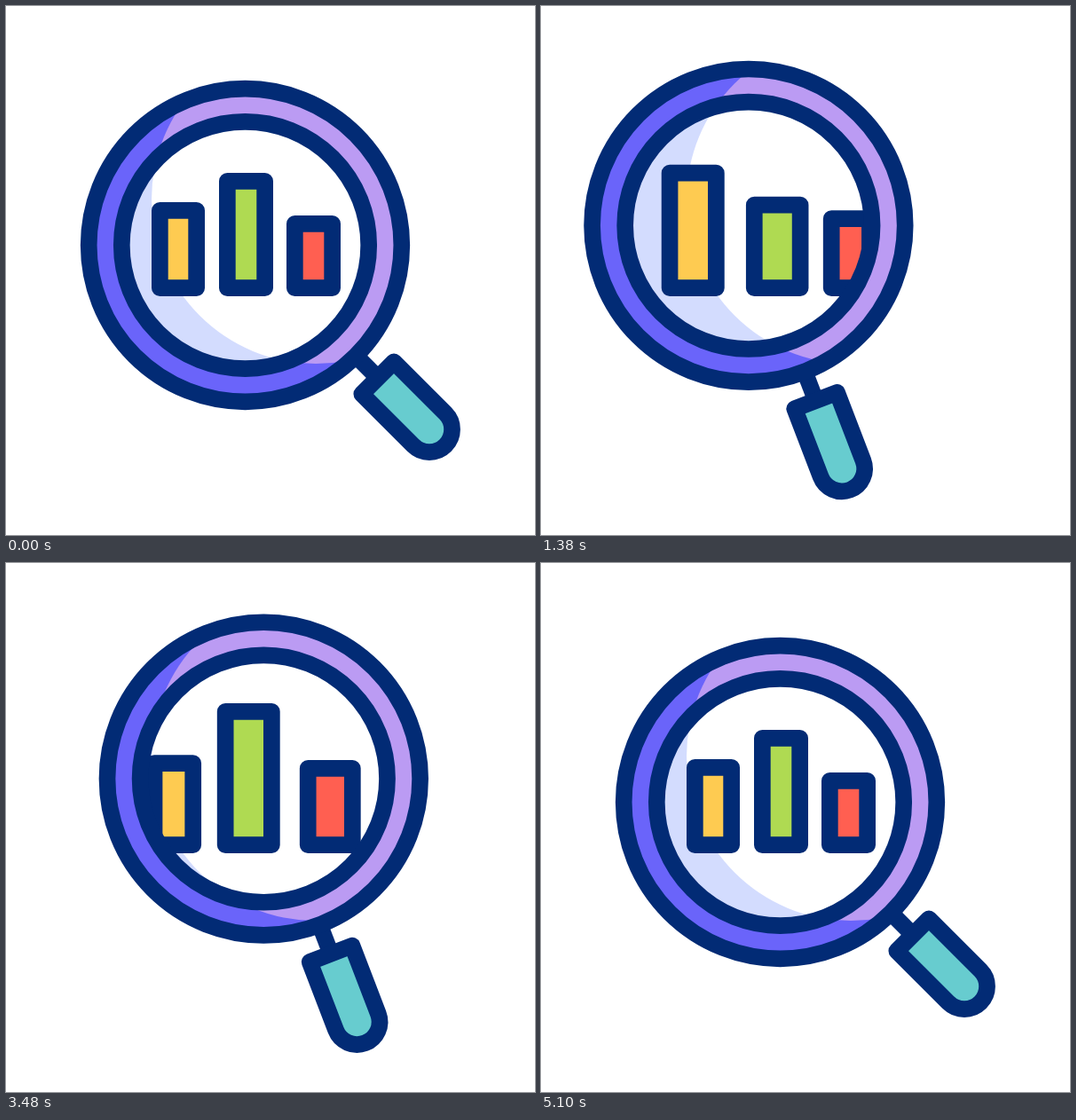
An HTML page with a canvas for the animation above (5400 ms loop, 596x596 px).

```html
<!DOCTYPE html>
<html lang="en">
<head>
<meta charset="utf-8">
<title>Magnified chart</title>
<style>
  html, body { margin: 0; width: 100%; height: 100%; overflow: hidden; background: #fff; }
  canvas { display: block; }
</style>
</head>
<body>
<canvas id="stage" width="596" height="596"></canvas>
<script>
const ctx = document.getElementById('stage').getContext('2d');
const LOOP = 5400, TAU = Math.PI * 2, NAVY = '#022b75', STROKE = 18.7;
const BASELINE = 327, REACH = 293.4; // REACH: lens centre to handle cap
const FILLS = ['#fecb51', '#afda52', '#ff5f51'];

// Left and right edges of the three bars for each lens position
const REST = [164, 224, 240, 301, 316, 377];
const FIRST = [142, 213, 239, 310, 334, 404];
const LEFT = [135, 206, 230, 300.5, 316, 377];
const RIGHT = [164, 224, 240, 311, 335, 406];

// The handle cap is the pivot of the whole glass
function pose(time, x, y, degrees, edges, tops) {
  const angle = degrees * Math.PI / 180;
  const cap = [x + REACH * Math.cos(angle), y + REACH * Math.sin(angle)];
  return [time, ...cap, angle, ...edges, ...tops];
}

const poses = [
  pose(300, 269.5, 269.5, 45, REST, [221, 188, 236]),
  pose(900, 322.3, 225.5, 69, FIRST, [195, 222, 181]),
  pose(1500, 223.8, 249.8, 69, LEFT, [177, 214, 236]),
  pose(2100, 223.8, 249.8, 69, LEFT, [199, 158, 236]),
  pose(2700, 308.2, 245, 69, RIGHT, [221, 188, 218]),
  pose(3000, 308.2, 245, 69, RIGHT, [221, 200, 195]),
  pose(3300, 308.2, 245, 69, RIGHT, [221, 158, 218]),
  pose(3900, 226.2, 236, 69, LEFT, [199, 158, 236]),
  pose(4200, 226.2, 236, 69, LEFT, [182, 190, 236]),
  pose(4500, 226.2, 236, 69, LEFT, [199, 158, 236]),
  pose(5100, 269.5, 269.5, 45, REST, [221, 188, 236])
];

// Strength of the glass tint
const tints = [[600, 0], [900, 1], [1100, 1], [1350, 0], [1800, 0], [2100, 1],
  [2700, 1], [3000, 0], [3900, 0], [4200, 1], [4600, 1], [4900, 0]];

function sample(keys, time) {
  const next = keys.findIndex(key => key[0] > time);
  if (next === 0) return keys[0].slice(1);
  if (next < 0) return keys[keys.length - 1].slice(1);
  const from = keys[next - 1], to = keys[next];
  const p = (time - from[0]) / (to[0] - from[0]);
  const eased = p * p * (3 - 2 * p);
  return from.map((value, i) => value + (to[i] - value) * eased).slice(1);
}

function circle(x, y, radius) {
  ctx.beginPath();
  ctx.arc(x, y, radius, 0, TAU);
}

function disc(x, y, radius, color) {
  circle(x, y, radius);
  ctx.fillStyle = color;
  ctx.fill();
}

// A disc in the shade colour, lit where the fixed light circle covers it
function shadedDisc(x, y, radius, shade, light) {
  ctx.save();
  disc(x, y, radius, shade);
  ctx.clip();
  disc(349, 218, 185, light);
  ctx.restore();
}

function drawBar(left, right, top, color) {
  const inset = STROKE / 2;
  ctx.beginPath();
  ctx.rect(left + inset, top + inset, right - left - STROKE, BASELINE - top - STROKE);
  ctx.fillStyle = color;
  ctx.fill();
  ctx.stroke();
}

function drawHandle(x, y, angle) {
  ctx.save();
  ctx.translate(x, y);
  ctx.rotate(angle);
  ctx.beginPath();
  ctx.moveTo(176, 0);
  ctx.lineTo(212, 0);
  ctx.stroke();
  ctx.beginPath();
  ctx.moveTo(211.3, -25.6);
  ctx.arc(REACH, 0, 25.6, -TAU / 4, TAU / 4);
  ctx.lineTo(211.3, 25.6);
  ctx.closePath();
  ctx.fillStyle = '#67cccf';
  ctx.fill();
  ctx.stroke();
  ctx.restore();
}

function draw(time) {
  const [capX, capY, angle, ...bars] = sample(poses, time);
  const [tint] = sample(tints, time);
  const x = capX - REACH * Math.cos(angle);
  const y = capY - REACH * Math.sin(angle);
  const glass = `rgb(${255 - 18 * tint}, ${255 - 15 * tint}, ${255 - 4 * tint})`;

  ctx.fillStyle = '#fff';
  ctx.fillRect(0, 0, 596, 596);
  ctx.strokeStyle = NAVY;
  ctx.lineWidth = STROKE;
  ctx.lineJoin = 'round';

  drawHandle(x, y, angle);
  shadedDisc(x, y, 176, '#6a64fa', '#bb9bf3');
  shadedDisc(x, y, 139.2, '#d3dcfe', glass);

  ctx.save();
  circle(x, y, 139.2);
  ctx.clip();
  FILLS.forEach((color, i) => drawBar(bars[2 * i], bars[2 * i + 1], bars[6 + i], color));
  ctx.restore();

  for (const radius of [139.2, 176.3]) {
    circle(x, y, radius);
    ctx.stroke();
  }
}

function tick() {
  draw(performance.now() % LOOP);
  requestAnimationFrame(tick);
}
tick();
</script>
</body>
</html>
```
